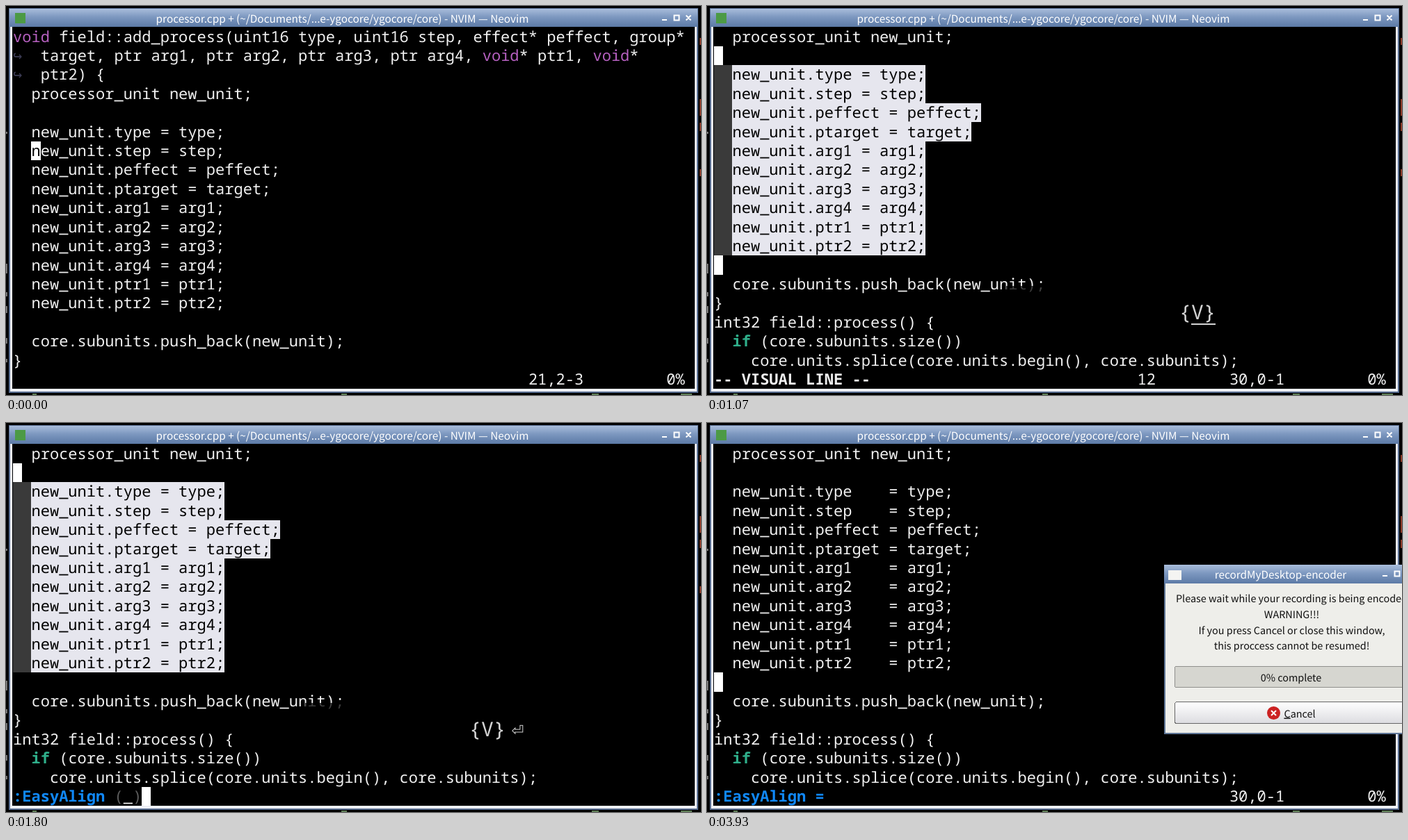
Animation of 999x560 px, one loop 3990 ms. Source, as an HTML page:

```html
<!DOCTYPE html>
<html lang="en">
<head>
<meta charset="utf-8">
<title>Aligning assignments</title>
<style>
  html, body { margin: 0; width: 100%; height: 100%; overflow: hidden; background: #000; }
  svg { display: block; width: 999px; height: 560px; }
  text { white-space: pre; text-rendering: geometricPrecision; }
  rect { shape-rendering: crispEdges; }
  .code { font: 500 22.05px "Noto Sans Mono", "DejaVu Sans Mono", monospace; fill: #f0f0f0; }
  .keys { font: 300 29px "Noto Sans Mono", "DejaVu Sans Mono", monospace; fill: #d4d4d4; }
  .ui { font: 14.4px "Noto Sans CJK SC", "Noto Sans CJK JP", "Noto Sans", sans-serif; fill: #101010; text-anchor: middle; }
  .title { font-size: 15.35px; fill: #fff; }
  .type { fill: #b660c0; }
  .word { fill: #2fae8a; font-weight: bold; }
  .wrap { fill: #3b3b54; }
  .bold { font-weight: bold; }
  .cmd { fill: #1088f8; font-weight: bold; }
  .dim { fill: #5c5c5c; }
  .dark { fill: #000; }
  .line { fill: none; stroke: #fff; stroke-width: 2; }
</style>
</head>
<body>
<svg viewBox="0 0 999 560">
  <defs>
    <linearGradient id="bar" x2="0" y2="1">
      <stop offset="0" stop-color="#a9bddb"/>
      <stop offset=".45" stop-color="#7d98c0"/>
      <stop offset="1" stop-color="#5c7aa6"/>
    </linearGradient>
    <linearGradient id="button" x2="0" y2="1">
      <stop offset="0" stop-color="#fff"/>
      <stop offset="1" stop-color="#dcdce0"/>
    </linearGradient>
  </defs>
  <rect width="999" height="560"/>
  <path d="M1 181v3M1 371v14M1 412v6M1 432v10M1 478v8M1 508v5" stroke="#777" stroke-width="2"/>
  <path d="M998 46v10M998 134v24M998 168v12M998 235v10" stroke="#8c3a28" stroke-width="2"/>
  <path d="M38 559h6M482 559h8M842 559h10M970 559h16" stroke="#5f7f58" stroke-width="2"/>
  <rect x="4" y="3" width="991" height="554" fill="#566b8e"/>
  <rect x="6" y="30" width="987" height="525" fill="#eef0f6"/>
  <rect x="5" y="4" width="989" height="26" fill="url(#bar)"/>
  <rect x="9" y="30" width="981" height="521"/>
  <rect x="13" y="10" width="15" height="15" fill="#4c9a45"/>
  <text class="ui title" x="483.5" y="23.5">processor.cpp + (~/Documents/...e-ygocore/ygocore/core) - NVIM — Neovim</text>
  <path class="line" d="M943 20h7M960.5 13.5h7v7h-7zM977.5 13.5l7 7m0-7l-7 7"/>
  <g id="screen"></g>
</svg>
<script>
const LOOP = 3990, COL = 13.23, ROW = 27.42, LEFT = 10, TOP = 30.3;
const screen = document.getElementById('screen');

const head = [
  'void field::add_process(uint16 type, uint16 step, effect* peffect, group*',
  '↪  target, ptr arg1, ptr arg2, ptr arg3, ptr arg4, void* ptr1, void*',
  '↪  ptr2) {'
];
const tail = [
  'int32 field::process() {',
  '  if (core.subunits.size())',
  '    core.units.splice(core.units.begin(), core.subunits);'
];
const fields = ['type', 'step', 'peffect', 'ptarget', 'arg1', 'arg2', 'arg3', 'arg4', 'ptr1', 'ptr2'];
const assign = (name, pad) =>
  `  new_unit.${name.padEnd(pad)} = ${name === 'ptarget' ? 'target' : name};`;
const body = pad => [
  '  processor_unit new_unit;', '',
  ...fields.map(name => assign(name, pad)),
  '', '  core.subunits.push_back(new_unit);', '}'
];

// Each step changes part of the state from its time (ms) on.
const steps = [
  [0, { cursor: [6, 2], pos: '21,2-3', keys: '', recent: 9, pad: 0 }],
  [670, { cursor: [4, 0], pos: '19,0-1' }],
  [730, { keys: '{', recent: 0 }],
  [870, { recent: 9 }],
  [930, { keys: '{V', recent: 1, count: '1' }],
  [1000, { keys: '{V}', count: '12', cursor: [12, 0] }],
  [1070, { scrolled: true, selected: true, pos: '30,0-1' }],
  [1200, { recent: 9 }],
  [1400, { keys: '{V}⏎', recent: 3, count: '', pos: '', prompt: true, cursor: [18, 14] }],
  [1530, { recent: 9 }],
  [1870, { keys: '{V}⏎=', recent: 4, prompt: false, selected: false, pad: 7,
           done: true, pos: '30,0-1', cursor: [12, 0] }],
  [2000, { recent: 9 }],
  [3800, { keys: '' }],
  [3870, { dialog: true }]
];

const colours = { void: 'type', if: 'word', '↪': 'wrap' };
const paint = s => s.replace(/\bvoid\b|\bif\b|↪/g, m => `<tspan class="${colours[m]}">${m}</tspan>`);
const text = (row, col, s, cls = '') =>
  `<text class="code ${cls}" x="${LEFT + col * COL}" y="${TOP + row * ROW + 21.2}">${s}</text>`;
const block = (row, col, n = 1, fill = '#fff') =>
  `<rect x="${LEFT + col * COL}" y="${TOP + row * ROW}" width="${n * COL}" height="${ROW}" fill="${fill}"/>`;

function codeRows(s) {
  const lines = s.scrolled ? [...body(s.pad), ...tail] : [...head, ...body(s.pad)];
  return lines.map((line, row) => {
    if (!s.selected || row < 1 || row > 11) return text(row, 0, paint(line));
    if (row === 1) return block(row, 0);
    return block(row, 0, 2, '#3a3a3a') + block(row, 2, line.length - 2, '#e6e6ee') +
      text(row, 0, line, 'dark');
  }).join('');
}

function statusRow(s) {
  let out = '';
  if (s.count) out += text(18, 0, '-- VISUAL LINE --', 'bold') + text(18, 46, s.count);
  if (s.prompt) out += text(18, 0, ':EasyAlign', 'cmd') +
    text(18, 11, '<tspan class="dim">(</tspan>_<tspan class="dim">)</tspan>');
  if (s.done) out += text(18, 0, ':EasyAlign =', 'cmd');
  if (s.pos) out += text(18, 56, s.pos) + text(18, 71, '0%');
  return out;
}

function cursor({ cursor: [row, col] }) {
  return block(row, col) + (col === 2 ? text(row, col, 'n', 'dark') : '');
}

function keyOverlay({ keys, recent }) {
  if (!keys) return '';
  const offset = i => [0, 17.5, 35, 61, 85.5][i];
  const width = offset(keys.length - 1) + 17.5, x0 = 705 - width / 2;
  const xs = [...keys].map((_, i) => x0 + offset(i)).join(' ');
  const mark = recent < keys.length
    ? `<rect x="${x0 + offset(recent)}" y="457" width="${width - offset(recent)}" height="2" fill="#d4d4d4"/>` : '';
  return `<rect x="430" y="403" width="550" height="75" opacity=".75"/>
    <text class="keys" x="${xs}" y="451">${keys}</text>${mark}`;
}

function dialog() {
  const label = (y, s, x = 840.5) => `<text class="ui" x="${x}" y="${y}">${s}</text>`;
  return `<rect x="657" y="204" width="350" height="244" fill="#5f7697"/>
    <rect x="659" y="231" width="350" height="215" fill="#eeeeea"/>
    <rect x="657" y="204" width="350" height="27" fill="url(#bar)"/>
    <rect x="663" y="212" width="19" height="14" fill="#f4f4f2"/>
    <text class="ui title" x="824.5" y="224">recordMyDesktop-encoder</text>
    <path class="line" d="M971 220h7M988.5 213.5h7v7h-7z"/>
    ${label(258, 'Please wait while your recording is being encoded')}
    ${label(280.5, 'WARNING!!!')}
    ${label(303.5, 'If you press Cancel or close this window,')}
    ${label(326, 'this proccess cannot be resumed!')}
    <rect x="672.5" y="350.5" width="337" height="30" rx="2" fill="#d6d6d0" stroke="#8f8f8c"/>
    ${label(371.5, '0% complete', 839.5)}
    <rect x="672.5" y="401.5" width="337" height="31" rx="3" fill="url(#button)" stroke="#666"/>
    <circle cx="814.5" cy="417.5" r="9.5" fill="#cc2222"/>
    <path class="line" d="M811 414l7 7m0-7l-7 7"/>
    ${label(423.5, '<tspan text-decoration="underline">C</tspan>ancel', 852)}`;
}

let shown = 0;
function frame(now) {
  const t = now % LOOP;
  const past = steps.filter(([at]) => at <= t);
  if (past.length !== shown) {
    shown = past.length;
    const s = Object.assign({}, ...past.map(step => step[1]));
    screen.innerHTML = codeRows(s) + statusRow(s) + cursor(s) + keyOverlay(s) +
      (s.dialog ? dialog() : '');
  }
  requestAnimationFrame(frame);
}
frame(performance.now());
</script>
</body>
</html>
```
